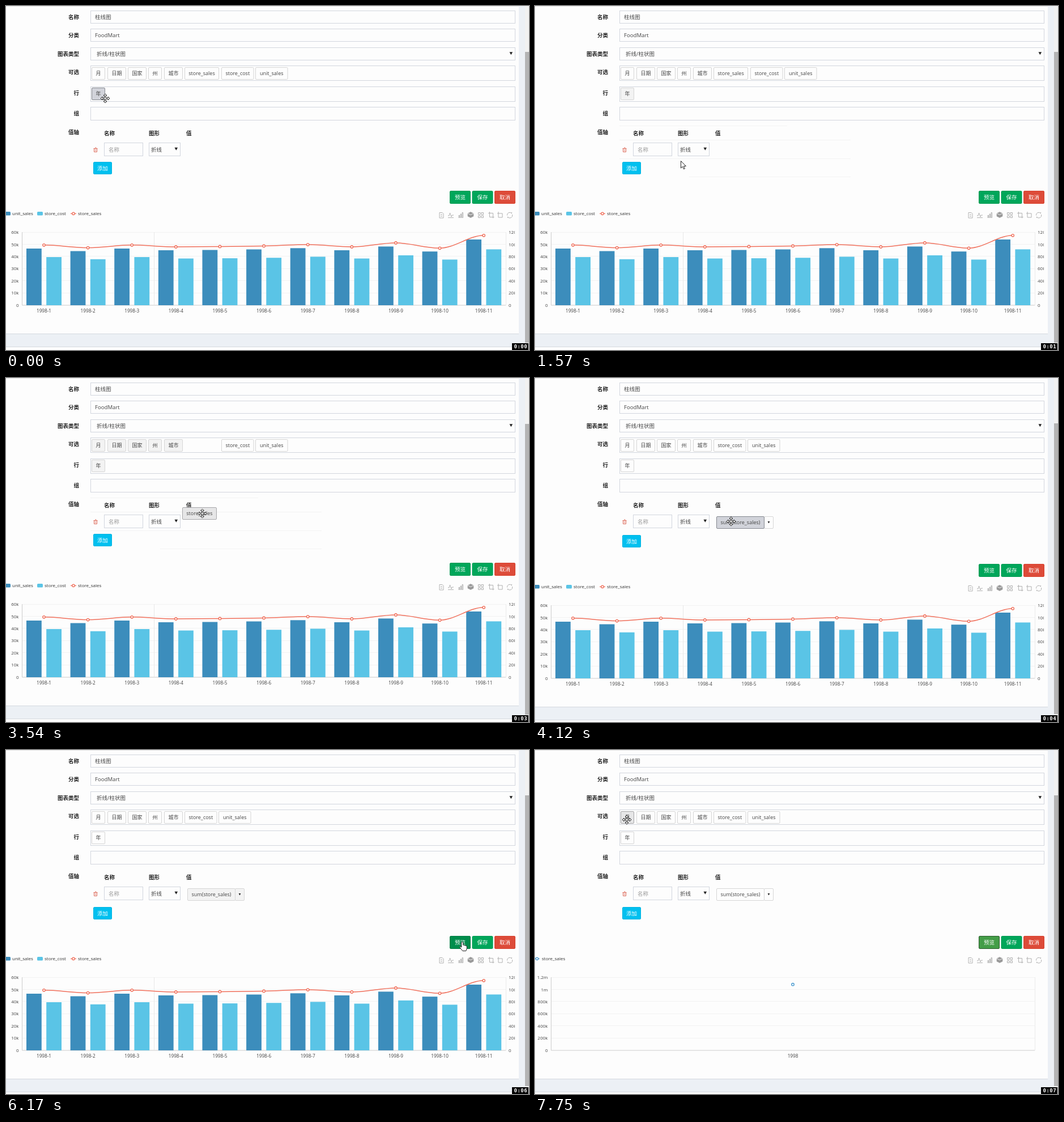
Animation, 923 px wide and 607 px high, one loop 8 s. Source, as an HTML page:

```html
<!DOCTYPE html>
<html lang="zh">
<head>
<meta charset="utf-8">
<title>Chart editor</title>
<style>
html, body { margin: 0; width: 100%; height: 100%; overflow: hidden; background: #fdfdfd; }
svg { display: block; width: 923px; height: 607px; font-family: "Open Sans", "Noto Sans CJK SC", "Noto Sans CJK", sans-serif; }
text { white-space: pre; }
</style>
</head>
<body>
<svg id="stage" viewBox="0 0 923 607"></svg>
<script>
const LOOP = 8000, STEP = 130, DRAG = 2990, DROP = 4120, PREVIEW = 6320;
const PAGE = '#fdfdfd', INK = '#444', BLUE = '#3c8dbc', SKY = '#5ac4e6', RED = '#f0705c', RING = '#4a9bd0';
const stage = document.getElementById('stage');
const $ = id => document.getElementById(id);
const list = (n, draw) => Array.from({ length: n }, (_, i) => draw(i)).join('');

const rect = (x, y, w, h, fill, stroke = 'none', rx = 0, more = '') =>
  `<rect x="${x}" y="${y}" width="${w}" height="${h}" fill="${fill}" stroke="${stroke}" rx="${rx}" ${more}/>`;
const text = (x, y, s, size = 9.5, fill = INK, anchor = 'start', weight = 400) =>
  `<text x="${x}" y="${y}" font-size="${size}" fill="${fill}" text-anchor="${anchor}" font-weight="${weight}">${s}</text>`;
const path = (d, stroke, width = 1, fill = 'none', more = '') =>
  `<path d="${d}" stroke="${stroke}" stroke-width="${width}" fill="${fill}" ${more}/>`;
const ring = (x, y, c, id = '') =>
  `<circle ${id} cx="${x}" cy="${y}" r="2.2" fill="#fff" stroke="${c}" stroke-width="1.4"/>`;
const field = (x, y, w, h) => rect(x, y, w, h, PAGE, '#d2d6de');
const caret = (x, y, r) => path(`M${x - r} ${y - r}h${2 * r}l${-r} ${r * 1.8}z`, 'none', 0, '#222');
const button = (id, x, y, w, h, s, fill, stroke) =>
  rect(x, y, w, h, fill, stroke, 1.5, `id="${id}"`) +
  text(x + w / 2, y + h / 2 + 3.5, s, 9.5, '#fff', 'middle', 500);
const tag = t => `<g id="${t.id}">` + rect(t.x, t.y, t.w, 21, PAGE, '#d6d6d6', 1.5) +
  text(t.x + t.w / 2, t.y + 13.9, t.s, 9, INK, 'middle') + '</g>';

// available fields flow from left to right, the chosen one sits in the row below
const tags = [];
let flow = 151.6;
['月', '日期', '国家', '州', '城市', 'store_sales', 'store_cost', 'unit_sales'].forEach((s, i) => {
  const w = s.length < 3 ? 14 + 9 * s.length : 21.5 + 3.5 * s.length;
  tags.push({ id: 'tag' + i, x: Math.floor(flow) + .5, y: 108.5, w, s });
  flow += w + 4.4;
});
tags.push({ id: 'year', x: 151.5, y: 144.5, w: 23, s: '年' });
const sum = { id: 'sumTag', x: 320.5, y: 244.5, w: 84, s: 'sum(store_sales)' };

function form() {
  const tops = [8.5, 40.5, 73.5, 105.5, 142.5, 178.5, 212];
  const names = ['名称', '分类', '图表类型', '可选', '行', '组', '值轴'];
  const rows = names.map((s, i) => text(129, tops[i] + 14, s, 9.5, '#222', 'end', 700) +
    (i < 6 ? field(149.5, tops[i], 749, i < 3 ? 22 : i < 5 ? 26 : 23) : ''));
  const head = (x, s) => text(x, 227.6, s, 9.5, '#222', 'start', 700);
  return path('M0 .5H905', '#e6e6e6') + rows.join('') +
    text(157, 22.8, '柱线图') + text(157, 55.3, 'FoodMart', 9.6) + text(160, 88.2, '折线/柱状图') +
    caret(891.3, 84, 2.8) +
    path('M149 211.5H445M149 236.5H557M149 269.5H557M272 301.5H557', '#f3f3f3', 1, 'none', 'id="grid"') +
    head(173, '名称') + head(252, '图形') + head(318, '值') +
    path('M154.5 251.5h7M157 250h2.5M155.500 252v5.500h5v-5.500M158 253v3', '#dd6b5b') +
    field(173.5, 241.5, 68, 23) + text(181, 256.6, '名称', 9.5, '#999') +
    field(252.5, 241.5, 55, 23) + text(256, 256.6, '折线') + caret(300.3, 252.6, 2.8);
}

function icons() {
  const square = (x, y, s) => `M${x} ${y}h${s}v${s}h${-s}z`;
  const lines = 'M765 364.500h5l2 2v7.500h-7zM767 368h3M767 371h3' +
    'M780 370h2l1.500-5 2.500 7 1.500-3h2.500M780 373.500h10' +
    list(3, i => `M${799 + i * 3} 373.500v${-4 - i * 2.5}h1.500V373.500z`) +
    list(4, i => square(833.5 + i % 2 * 5.5, 364.5 + (i >> 1) * 5.5, 3.5)) +
    'M853.500 363v9.500h8M851 365.500h8.500v9' + square(869, 366, 7) + 'M869 363v3h-2' +
    'M884.500 369.500a4.500 4.500 0 0 1 8-3.500v-2M893.500 368a4.500 4.500 0 0 1-8 4v2';
  return path(lines, '#aaa', .9) + path('M820 363.500l5 2.500v5l-5 2.500-5-2.500v-5z', '#999', .6, '#999') +
    path('M815 366l5 2.500 5-2.500', '#eee');
}

function axes(labels, end) {
  const y = i => 399.5 + i * 21.4;
  return list(6, i => path(`M28 ${Math.round(y(i)) - .5}H882`, '#f2f2f2')) +
    labels.map((s, i) => text(22.5, y(i) + 2.6, s, 8, INK, 'end')).join('') +
    path('M882.500 399V528', '#ebebeb') + path('M28.500 399V528H882', '#ccc') + (end || '');
}

// smooth curve, flat at its peaks
function curve(p) {
  const slope = p.map((v, i) => {
    if (!i || i === p.length - 1) return 0;
    const a = v[1] - p[i - 1][1], b = p[i + 1][1] - v[1];
    return a * b <= 0 ? 0 : 2 * a * b / (a + b);
  });
  return p.reduce((d, [x, y], i) => {
    if (!i) return `M${x} ${y}`;
    const [px, py] = p[i - 1], k = (x - px) / 3;
    return d + `C${px + k} ${py + slope[i - 1] / 3} ${x - k} ${y - slope[i] / 3} ${x} ${y}`;
  }, '');
}

// cost and sales follow the units at a steady ratio
function barChart() {
  const units = [100, 95.5, 100, 97, 97.5, 98.5, 100.7, 97, 103.6, 94.8, 116];
  const cx = i => 67 + i * 77.62;
  const bar = (x, h, c) => rect(x, 528 - h, 26.8, h, c);
  const points = units.map((h, i) => [cx(i), 528 - h * 1.062]);
  const legend = (x, c, s) => rect(x, 363, 10, 6.5, c, 'none', 1.5) + text(x + 13, 369.4, s, 8, '#333');
  return legend(-2, BLUE, 'unit_sales') + legend(55, SKY, 'store_cost') +
    path('M114 366.300h10', RED, 1.2) + ring(119, 366.3, RED) + text(127, 369.4, 'store_sales', 8, '#333') +
    axes([60, 50, 40, 30, 20, 10, 0].map(n => n ? n + 'k' : 0), path('M261.500 399V527', '#e8e8e8')) +
    '<g clip-path="url(#cut)">' + list(7, i => text(887, 402.1 + i * 21.4, i < 6 ? 120 - i * 20 + 'k' : 0, 8)) + '</g>' +
    units.map((h, i) => bar(cx(i) - 31, h, BLUE) + bar(cx(i) + 4.2, h * .85, SKY) +
      text(cx(i), 540.7, '1998-' + (i + 1), 8.2, INK, 'middle')).join('') +
    path(curve(points), RED, 1.5) + points.map(p => ring(...p, RED)).join('');
}

function pointChart() {
  return path('M-1 366.300h9', RING, 1.2) + ring(3.5, 366.3, RING) + text(12, 369.4, 'store_sales', 8, '#333') +
    axes(['1.2m', '1m', '800k', '600k', '400k', '200k', 0]) +
    text(455, 540.7, '1998', 8.2, INK, 'middle') + ring(455, 411.7, RING, 'id="dot"');
}

const pointers = {
  arrow: 'M0 0V12.500L2.900 9.800L5 14.300L6.900 13.400L4.900 9.100H8.900Z',
  move: 'M0-8L3-5H1V-1H5V-3L8 0L5 3V1H1V5H3L0 8L-3 5H-1V1H-5V3L-8 0L-5-3V-1H-1V-5H-3Z',
  hand: 'M-1.500 7V.500Q0-1.500 1.500.500V5L6.300 6.200L8 7.500V11L6.500 15.500H.500L-5 8.500Q-4 6.500-1.500 9Z'
};

stage.innerHTML = '<defs><clipPath id="cut"><rect x="880" y="380" width="18" height="160"/></clipPath></defs>' +
  rect(905, 0, 11, 607, '#ecf0f5') + rect(916, 0, 7, 607, '#f1f1f1') +
  rect(916, 81, 7, 513, '#b4b4b4', 'none', 0, 'id="thumb"') + form() +
  '<g id="lower">' +
  button('add', 154.5, 275.5, 32, 21, '添加', '#00c0ef', '#00b4e2') +
  button('preview', 783.5, 326.5, 36, 22, '预览', '#00a65a', '#009a53') +
  button('save', 823, 326.5, 36, 22, '保存', '#00a65a', '#009a53') +
  button('cancel', 862.5, 326.5, 36, 22, '取消', '#dd4b39', '#d9422f') +
  icons() + `<g id="bars">${barChart()}</g><g id="point">${pointChart()}</g>` +
  rect(0, 578, 916, 23, '#ecf0f5') + path('M0 578.500H905M0 601.500H916', '#d5d9df') +
  '</g>' + tags.map(tag).join('') +
  '<g id="sum">' + rect(404.5, 244.5, 16, 21, PAGE, '#d6d6d6', 1.5) + caret(412.5, 255, 1.9) + tag(sum) + '</g>' +
  rect(893, 595, 29, 12, '#000') +
  '<text id="clock" x="896.5" y="604" font-family="DejaVu Sans Mono, monospace" font-weight="700" font-size="9" letter-spacing=".5" fill="#fff"></text>' +
  path('', '#222', 1, '#fff', 'id="pointer" stroke-linejoin="round"');
stage.append($('tag5'), $('pointer'));

// stops of the pointer: time, x, y
const stops = [
  [120, 175, 163], [700, 520, 245], [1500, 257.5, 273.5], [1600, 257.5, 273.5], [1950, 165, 122],
  [2430, 350.5, 119], [DRAG, 350.5, 119], [3640, 346, 253], [5120, 346, 253], [5560, 778.5, 340],
  [5720, 778.5, 340], [6150, 806, 339], [6400, 806, 339], [7360, 166, 158], [7670, 162, 123]
];

function pointerAt(t) {
  const now = Math.floor(t / STEP) * STEP;
  const i = stops.findIndex(s => s[0] > now);
  if (i < 0) return stops.at(-1).slice(1);
  if (!i) return stops[0].slice(1);
  const [t0, x0, y0] = stops[i - 1], [t1, x1, y1] = stops[i];
  const p = (now - t0) / (t1 - t0), e = p * p * (3 - 2 * p);
  return [x0 + (x1 - x0) * e, y0 + (y1 - y0) * e];
}

const inside = (x, y, b, dx = 0) => x >= b.x + dx && x <= b.x + dx + b.w + 1 && y >= b.y && y <= b.y + 21;
const show = (id, on) => $(id).setAttribute('visibility', on ? 'visible' : 'hidden');
const shift = (id, x, y) => $(id).setAttribute('transform', `translate(${x} ${y})`);
function paint(el, fill, stroke) {
  el.setAttribute('fill', fill);
  el.setAttribute('stroke', stroke);
}
const looks = {
  plain: [PAGE, '#d6d6d6'], soft: ['#f3f3f3', '#d6d6d6'],
  hover: ['#e6e6e7', '#a5a5a8'], active: ['#d1d3da', '#858990']
};

function draw(t) {
  const [x, y] = pointerAt(t);
  const dropped = t >= DROP, dragging = t >= DRAG && !dropped;
  let kind = dragging ? 'move' : 'arrow';

  tags.forEach((g, i) => {
    const year = g.id === 'year', dx = dropped && !year && i > 5 ? -65 : 0;
    const over = !dragging && inside(x, y, g, dx) && !(dropped && i === 5);
    const held = dragging && i === 5;
    const soft = !dropped && (year || (i < 5 && t > 2000));
    if (over) kind = 'move';
    const look = year && t < 120 ? 'active' : over || held ? 'hover' : soft ? 'soft' : 'plain';
    paint($(g.id).firstChild, ...looks[look]);
    shift(g.id, held ? x - 350.5 : dx, held ? y - 119 : 0);
  });
  show('tag5', !dropped);

  const overSum = dropped && inside(x, y, sum);
  const rest = looks[t > 5140 && t < 7000 ? 'soft' : 'plain'];
  if (overSum) kind = 'move';
  show('sum', dropped);
  paint($('sum').firstChild, ...rest);
  paint($('sumTag').firstChild, ...(overSum ? looks.active : rest));

  shift('lower', 0, dropped ? 2 : 0);
  $('thumb').setAttribute('y', dropped ? 80 : 81);
  show('grid', t > 700 && !dropped);

  const overPreview = inside(x, y, { x: 784, y: 328.5, w: 35 });
  if (overPreview) kind = 'hand';
  paint($('preview'), ...(overPreview ? ['#008d4c', '#007d44'] :
    t > PREVIEW ? ['#449d48', '#2a5c2d'] : ['#00a65a', '#009a53']));

  show('bars', t < PREVIEW);
  show('point', t >= PREVIEW);
  const left = 1 - Math.min(1, Math.max(0, (t - PREVIEW) / 1000));
  const grow = 1 - .9 * left ** 3;
  $('dot').setAttribute('r', 2.2 * grow);
  $('dot').setAttribute('stroke-width', 1.4 * grow);

  $('clock').textContent = '0:0' + Math.floor(t / 1000);
  $('pointer').setAttribute('d', pointers[kind]);
  shift('pointer', x, y);
}

const start = performance.now();
function tick() {
  draw((performance.now() - start) % LOOP);
  requestAnimationFrame(tick);
}
tick();
</script>
</body>
</html>
```
